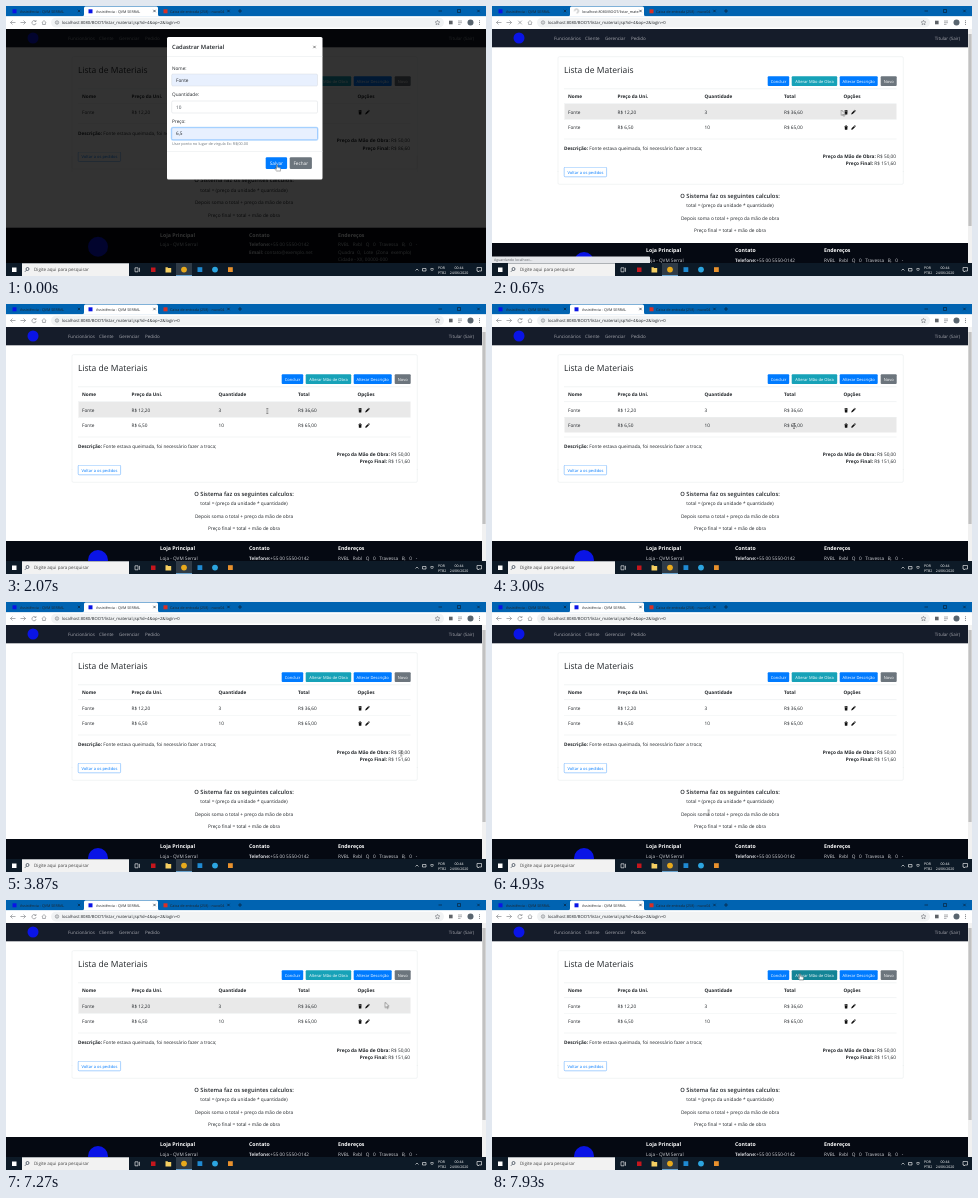
An HTML page that plays this animation: 480x270 px, repeating every 8 s.

```html
<!DOCTYPE html>
<html lang="pt-BR">
<head>
<meta charset="utf-8">
<title>Lista de Materiais</title>
<style>
html, body { margin: 0; width: 100%; height: 100%; overflow: hidden; background: #fff; }
svg { display: block; width: 480px; height: 270px; }
text { font: 4.7px "Open Sans", "Noto Sans", sans-serif; fill: #212529; text-rendering: geometricPrecision; white-space: pre; }
.b, .b text { font-weight: 700; }
.w text { fill: #fff; }
.c text, text.c { text-anchor: middle; }
.e { text-anchor: end; }
.tab text { font-size: 3.7px; }
.nav text { font-size: 4.5px; fill: #a3a5ac; }
.sm text { font-size: 4.05px; }
.tiny text { font-size: 3.5px; }
.sum text { font-size: 4.75px; }
.foot text { fill: #d3d5da; }
.foot .h { font-size: 5.2px; font-weight: 700; fill: #fff; }
.line { fill: none; stroke: #dee2e6; stroke-width: .4; }
.ink { fill: none; stroke: #6b6f74; stroke-width: .55; }
.lite { fill: none; stroke: #fff; stroke-width: .6; }
.dark { fill: none; stroke: #0b1a2b; stroke-width: .6; }

.t { animation: 8s step-end infinite; }
.old { animation-name: old; }
.fresh { animation-name: fresh; }
.below { animation-name: below; }
.busy { animation-name: busy; }
.idle { animation-name: idle; }
.row1 { animation-name: row1; }
.row2 { animation-name: row2; }
.btn { animation-name: btn; }
.hand { animation-name: hand; }
.beam { animation-name: beam; }
.arrow { animation-name: arrow; }
.spin { transform-origin: 84.5px 5px; animation: spin .9s linear infinite; }
.cursor { animation: path 8s linear infinite; }

@keyframes old { 0% { opacity: 1 } 5%, 100% { opacity: 0 } }
@keyframes fresh { 0% { opacity: 0 } 5%, 100% { opacity: 1 } }
@keyframes below { 0% { transform: translateY(-15.3px) } 5%, 100% { transform: none } }
@keyframes busy { 0%, 12.5%, 100% { opacity: 0 } 2% { opacity: 1 } }
@keyframes idle { 0%, 12.5%, 100% { opacity: 1 } 2% { opacity: 0 } }
@keyframes row1 { 0%, 29.3%, 93.9%, 100% { opacity: 0 } 7.3%, 90.45% { opacity: 1 } }
@keyframes row2 { 0%, 7.3%, 40.5%, 90.45%, 100% { opacity: 0 } 5.9%, 29.3%, 89.7% { opacity: 1 } }
@keyframes btn { 0% { fill: #17a2b8 } 98.1%, 100% { fill: #138496 } }
@keyframes hand { 0%, 98.1%, 100% { opacity: 1 } 3.9% { opacity: 0 } }
@keyframes beam { 0%, 28%, 40%, 55%, 85%, 100% { opacity: 0 } 16.5%, 31.5%, 47%, 58% { opacity: 1 } }
@keyframes arrow { 0%, 16.5%, 31.5%, 47%, 58%, 98.1%, 100% { opacity: 0 } 3.9%, 28%, 40%, 55%, 85% { opacity: 1 } }
@keyframes spin { to { transform: rotate(360deg) } }
@keyframes path {
  0%, 3% { transform: translate(271px, 158.5px) }
  8%, 12% { transform: translate(349.5px, 104px) }
  17.5% { transform: translate(127px, 105px) }
  20.5% { transform: translate(135px, 106px) }
  24% { transform: translate(216px, 107px) }
  27.5% { transform: translate(300px, 107px) }
  32% { transform: translate(130px, 122px) }
  35% { transform: translate(215px, 122px) }
  37%, 39.5% { transform: translate(302px, 122px) }
  44% { transform: translate(372px, 150px) }
  48% { transform: translate(395px, 151px) }
  54% { transform: translate(398px, 158px) }
  56% { transform: translate(280px, 185px) }
  58.5% { transform: translate(200px, 200px) }
  61.6% { transform: translate(216px, 210.5px) }
  66% { transform: translate(285px, 212px) }
  71% { transform: translate(205px, 225px) }
  80%, 85% { transform: translate(226px, 226px) }
  90.9%, 92.5% { transform: translate(379.5px, 102px) }
  99%, 100% { transform: translate(308px, 73.5px) }
}
</style>
</head>
<body>
<svg viewBox="0 0 480 270">
  <defs>
    <g id="tools" fill="#111">
      <path d="M352.4 104.6h3.4v.6h-3.4zM353.5 104h1.2v.6h-1.2zM352.7 105.5h2.8l-.2 3h-2.4z"/>
      <path d="M359.2 108.5l.4-1.5 2.4-2.4 1.1 1.1-2.4 2.4zM362.3 104.3l.5-.5 1.1 1.1-.5.5z"/>
    </g>
    <path id="x" d="M-1.2-1.2l2.4 2.4M1.2-1.2l-2.4 2.4"/>
  </defs>

  <!-- page -->
  <rect width="480" height="270" fill="#fff"/>
  <rect y="23" width="480" height="18.3" fill="#151c2a"/>
  <circle cx="27" cy="32" r="5.5" fill="#0a14e6"/>
  <g class="nav">
    <text x="62" y="33.6">Funcionários</text>
    <text x="93" y="33.6">Cliente</text>
    <text x="113" y="33.6">Gerenciar</text>
    <text x="139" y="33.6">Pedido</text>
    <text x="468" y="33.6" class="e">Titular (Sair)</text>
  </g>

  <text x="72" y="67" style="font-size:8.5px">Lista de Materiais</text>
  <rect x="275.7" y="70.3" width="21.5" height="9.8" rx="1" fill="#007bff"/>
  <rect x="299.7" y="70.3" width="45.5" height="9.8" rx="1" class="t btn"/>
  <rect x="347.7" y="70.3" width="38" height="9.8" rx="1" fill="#007bff"/>
  <rect x="388.7" y="70.3" width="16" height="9.8" rx="1" fill="#6c757d"/>
  <g class="sm w c">
    <text x="286.5" y="76.7">Concluir</text>
    <text x="322.5" y="76.7">Alterar Mão de Obra</text>
    <text x="366.7" y="76.7">Alterar Descrição</text>
    <text x="396.7" y="76.7">Novo</text>
  </g>

  <path class="line" d="M72 82.8H404.5M72 97.6H404.5"/>
  <g class="b">
    <text x="76" y="92.1">Nome</text>
    <text x="125.5" y="92.1">Preço da Uni.</text>
    <text x="212.5" y="92.1">Quantidade</text>
    <text x="292" y="92.1">Total</text>
    <text x="351.5" y="92.1">Opções</text>
  </g>
  <rect class="t row1" x="72.5" y="98" width="332" height="15.2" fill="#e9e9e9"/>
  <text x="76" y="107.6">Fonte</text>
  <text x="125.5" y="107.6">R$ 12,20</text>
  <text x="212.5" y="107.6">3</text>
  <text x="292" y="107.6">R$ 36,60</text>
  <use href="#tools"/>
  <g class="t fresh">
    <rect class="t row2" x="72.5" y="113.3" width="332" height="15.2" fill="#e9e9e9"/>
    <path class="line" d="M72 113.2H404.5"/>
    <text x="76" y="122.9">Fonte</text>
    <text x="125.5" y="122.9">R$ 6,50</text>
    <text x="212.5" y="122.9">10</text>
    <text x="292" y="122.9">R$ 65,00</text>
    <use href="#tools" y="15.3"/>
  </g>

  <g class="t below">
    <path class="line" d="M72 133H404.5"/>
    <text x="72" y="144.1"><tspan class="b">Descrição:</tspan> Fonte estava queimada, foi necessário fazer a troca;</text>
    <g class="sum">
      <text x="404" y="151.8" class="e"><tspan class="b">Preço da Mão de Obra:</tspan> R$ 50,00</text>
      <g class="t old"><text x="404" y="159.2" class="e"><tspan class="b">Preço Final:</tspan> R$ 86,60</text></g>
      <g class="t fresh"><text x="404" y="159.2" class="e"><tspan class="b">Preço Final:</tspan> R$ 151,60</text></g>
    </g>
    <rect x="72.2" y="161.2" width="42.4" height="9.6" rx="1" fill="none" stroke="#007bff" stroke-width=".35"/>
    <g class="sm c"><text x="93.5" y="167.6" style="fill:#007bff">Voltar a os pedidos</text></g>
    <path class="line" d="M66 165V177a1.3 1.3 0 0 0 1.3 1.3H410a1.3 1.3 0 0 0 1.3-1.3V165"/>
    <g class="c">
      <text x="238" y="191.6" style="font-size:5.8px;font-weight:600">O Sistema faz os seguintes calculos:</text>
      <g class="sum">
        <text x="238" y="201.2">total = (preço da unidade * quantidade)</text>
        <text x="238" y="213.7">Depois soma o total + preço da mão de obra</text>
        <text x="238" y="226.2">Preço final = total + mão de obra</text>
      </g>
    </g>
    <rect y="237" width="480" height="50" fill="#050912"/>
    <circle cx="92" cy="256" r="10" fill="#0a14e6"/>
    <g class="foot">
      <text class="h" x="154" y="245.9">Loja Principal</text>
      <text class="h" x="243" y="245.9">Contato</text>
      <text class="h" x="332" y="245.9">Endereços</text>
      <text x="154" y="255.7">Loja - QVM Serral</text>
      <text x="243" y="255.7"><tspan class="b">Telefone:</tspan>+55 00 5550-0142</text>
      <text x="243" y="263.2"><tspan class="b">Email:</tspan> contato@exemplo.net</text>
      <text x="332" y="255.7" style="word-spacing:2.4px">RVBL Rvbl Q 0 Travessa B, 0 -</text>
      <text x="332" y="263.2" style="word-spacing:1.5px">Quadra 0, Lote (Zona exemplo)</text>
      <text x="332" y="270.5">Cidade - XX, 00000-000</text>
    </g>
  </g>
  <path class="line" d="M66 166V52a1.3 1.3 0 0 1 1.3-1.3H410a1.3 1.3 0 0 1 1.3 1.3V166"/>
  <g class="t fresh">
    <rect x="476" y="23" width="4" height="234" fill="#f1f1f1"/>
    <rect x="476.4" y="28" width="3.2" height="192" fill="#c1c1c1"/>
  </g>

  <!-- dialog -->
  <g class="t old">
    <rect y="23" width="480" height="235" fill="#000" opacity=".8"/>
    <rect x="161" y="31" width="155.5" height="142.5" rx="1.5" fill="#fff"/>
    <path class="line" d="M161 50.5H316.5M161 145.5H316.5"/>
    <text x="166" y="43.2" style="font-size:5.8px;font-weight:600">Cadastrar Material</text>
    <use href="#x" x="308.5" y="41" stroke="#555" stroke-width=".7"/>
    <text x="166" y="63.6">Nome:</text>
    <text x="166" y="90.3">Quantidade:</text>
    <text x="166" y="117.1">Preço:</text>
    <g stroke="#ced4da" stroke-width=".4">
      <rect x="165.7" y="68" width="145.8" height="12" rx="1.2" fill="#e8f0fe"/>
      <rect x="165.7" y="95" width="145.8" height="12" rx="1.2" fill="#fff"/>
      <rect x="165.7" y="121.7" width="145.8" height="12" rx="1.2" fill="#e8f0fe" stroke="#bfdeff" stroke-width="2"/>
      <rect x="165.7" y="121.7" width="145.8" height="12" rx="1.2" fill="#e8f0fe" stroke="#80bdff" stroke-width=".6"/>
    </g>
    <text x="170" y="75.7">Fonte</text>
    <text x="170" y="102.7" style="fill:#495057">10</text>
    <text x="170" y="129.4">6,5</text>
    <text x="166" y="139.3" style="font-size:3.8px;fill:#6c757d">Usar ponto no lugar de virgula Ex: R$(00.00</text>
    <rect x="259.7" y="151.2" width="21.4" height="11.8" rx="1.2" fill="#007bff"/>
    <rect x="283.7" y="151.2" width="22.2" height="11.8" rx="1.2" fill="#6c757d"/>
    <g class="w c">
      <text x="270.4" y="158.8">Salvar</text>
      <text x="294.8" y="158.8">Fechar</text>
    </g>
  </g>

  <!-- browser frame -->
  <rect width="480" height="10.5" fill="#0063b1"/>
  <path d="M76 10.5q2 0 2-2V2q0-1.5 1.5-1.5h71q1.5 0 1.5 1.5V8.5q0 2 2 2z" fill="#fff"/>
  <rect y="10.3" width="480" height="12.7" fill="#fff"/>
  <rect x="6.5" y="3.3" width="4" height="4" fill="#0a14e6"/>
  <rect x="157.5" y="3.3" width="4" height="4" fill="#d93025"/>
  <g class="tab">
    <text x="14" y="6.6">Assistência - QVM SERRAL</text>
    <text x="164" y="6.6">Caixa de entrada (258) - nuvo04</text>
    <g class="t idle">
      <rect x="82.5" y="3.3" width="4" height="4" fill="#0a14e6"/>
      <text x="90" y="6.6">Assistência - QVM SERRAL</text>
    </g>
    <g class="t busy">
      <path class="ink spin" d="M84.5 3a2 2 0 1 1-2 2"/>
      <text x="90" y="6.6">localhost:8080/BOOT/listar_mate</text>
    </g>
  </g>
  <g class="dark">
    <use href="#x" x="73" y="5"/>
    <use href="#x" x="148.5" y="5"/>
    <use href="#x" x="222.5" y="5"/>
    <path d="M232 5h4M234 3v4M432.5 5h3.5M451.5 3.5h3v3h-3z"/>
    <use href="#x" x="472.5" y="5"/>
  </g>
  <g class="ink">
    <path d="M9.5 16.5h-5l2-2m-2 2l2 2M14.5 16.5h5l-2-2m2 2l-2 2M36 16.5l2-2 2 2M36.6 16.2v2.3h2.8v-2.3"/>
    <path class="t idle" d="M29.6 15.3a2.1 2.1 0 1 0 .5 1.8M30 14v1.5h-1.5"/>
    <path class="t busy" d="M26.2 14.7l3.6 3.6M29.8 14.7l-3.6 3.6"/>
  </g>
  <rect x="45" y="11.8" width="393" height="9.6" rx="4.8" fill="#f1f3f4"/>
  <g class="ink">
    <circle cx="51" cy="16.5" r="1.7"/>
    <path d="M51 16.2v1.3M51 15.3v.4"/>
    <path d="M431.5 14.2l.7 1.6 1.7.1-1.3 1.2.4 1.7-1.5-.9-1.5.9.4-1.7-1.3-1.2 1.7-.1z"/>
    <path d="M452 15h4M452 16.7h4M452 18.4h2.5"/>
  </g>
  <text x="56" y="18" style="font-size:4.2px">localhost:8080/BOOT/listar_material.jsp?id=4&amp;op=2&amp;login=0</text>
  <rect x="443" y="14.7" width="3.6" height="3.6" fill="#5f6368"/>
  <circle cx="464.5" cy="16.5" r="3" fill="#59656f"/>
  <g fill="#5f6368">
    <circle cx="473.5" cy="14.7" r=".5"/>
    <circle cx="473.5" cy="16.5" r=".5"/>
    <circle cx="473.5" cy="18.3" r=".5"/>
  </g>

  <g class="t busy tiny">
    <path d="M0 250.5H157q1 0 1 1V258H0z" fill="#e4e6ea"/>
    <text x="2" y="255.3" style="fill:#5f6368">Aguardando localhost...</text>
  </g>

  <!-- taskbar -->
  <rect y="257" width="480" height="13" fill="#0d1a27"/>
  <rect x="6" y="261.5" width="4.5" height="4.5" fill="#fff"/>
  <rect x="16" y="257.3" width="107" height="12.7" fill="#f2f2f2"/>
  <g class="dark">
    <circle cx="21.5" cy="263" r="1.5"/>
    <path d="M20.4 264.2l-1.5 1.6"/>
  </g>
  <text x="28" y="265.3" style="font-size:4.5px;fill:#444">Digite aqui para pesquisar</text>
  <path class="lite" d="M129 261.8h3v4h-3zM133.5 261.8v4"/>
  <rect x="170" y="257" width="16" height="13" fill="#2f3b47"/>
  <rect x="170" y="269.2" width="16" height=".8" fill="#76b9ed"/>
  <rect x="145" y="261.5" width="4.5" height="4.5" fill="#c5161d"/>
  <path d="M159.5 261.3h2l.7.8h3v4.4h-5.7z" fill="#f5cf62"/>
  <circle cx="178" cy="263.6" r="2.9" fill="#e8a91c"/>
  <rect x="191.5" y="261.2" width="4.8" height="4.8" fill="#1f8ad2"/>
  <circle cx="209" cy="263.6" r="2.9" fill="#2ca5e0"/>
  <rect x="222" y="261.2" width="4.8" height="4.8" fill="#e8912d"/>
  <g class="lite">
    <path d="M409.5 264.5l1.5-1.5 1.5 1.5M416.5 262.5h3.5v2.5h-3.5z"/>
    <path d="M424 263.3q2-2 4 0M424.9 264.5q1.1-1.1 2.2 0"/>
    <path d="M471 261.5h4.5v3.5h-2.5l-1 1v-1h-1z"/>
  </g>
  <g class="tiny w">
    <text x="432" y="262.5">POR</text>
    <text x="432" y="268.3">PTB2</text>
    <text x="453" y="262.5" class="c">00:44</text>
    <text x="453" y="268.3" class="c">24/06/2020</text>
  </g>

  <!-- pointer -->
  <g class="cursor" stroke-linejoin="round">
    <path class="t arrow" d="M0 0v5.5l1.3-1.2.9 2 .9-.4-.9-1.9h1.7z" fill="#fff" stroke="#000" stroke-width=".35"/>
    <path class="t beam" d="M-1-2.8q1 0 1 .6 0-.6 1-.6M0-2.2v4.4M-1 2.8q1 0 1-.6 0 .6 1 .6" fill="none" stroke="#000" stroke-width=".4"/>
    <path class="t hand" d="M-.6.4q.6-.8 1.2 0v2.3l2.7.6q.6.2.5.9l-.5 2.4h-3.6l-2-2.5q.3-.8 1.1-.2l.6.5z" fill="#fff" stroke="#000" stroke-width=".35"/>
  </g>
</svg>
</body>
</html>
```
